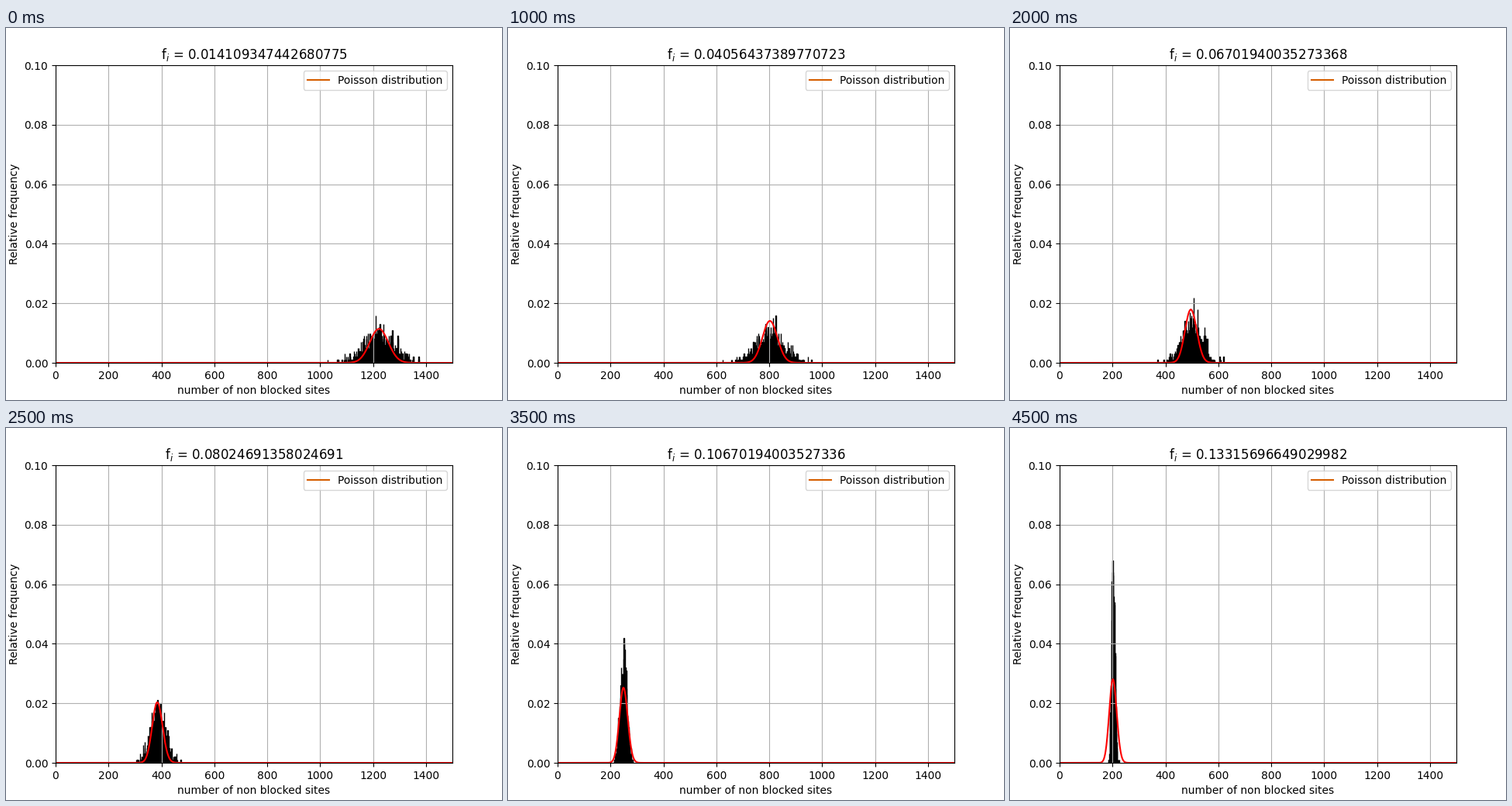
A matplotlib script that plays this animation: 640x480 px, repeating every 5000 ms.

```python
import numpy as np
import matplotlib.pyplot as plt
from matplotlib.animation import FuncAnimation

STEPS = 10
SAMPLES = 1000

sites = np.arange(1501)
log_fact = np.concatenate(([0], np.cumsum(np.log(sites[1:]))))

# smooth decay of the mean through a few key steps
mean_at = np.poly1d(np.polyfit([0, 1, 2, 5, 7, 9],
                               [1223, 997, 803, 385, 249.5, 202], 5))


def spread_at(i):
    return 51 / (1 + (i / 5.1) ** 3.5)


def poisson(mu):
    return np.exp(sites * np.log(mu) - log_fact - mu)


def histogram(i):
    rng = np.random.default_rng(40 + i)
    draws = rng.normal(mean_at(i), spread_at(i), SAMPLES)
    counts = np.bincount(np.rint(draws).astype(int), minlength=sites.size)
    x = np.flatnonzero(counts)
    return x, counts[x] / SAMPLES


fig = plt.figure(figsize=(6.4, 4.8), dpi=100)
ax = fig.add_axes([0.1, 0.1, 0.8, 0.8])
ax.set_xlim(0, 1500)
ax.set_ylim(0, 0.1)
ax.set_xlabel("number of non blocked sites")
ax.set_ylabel("Relative frequency")
ax.grid(True)
ax.plot([], [], color="#d55e00", label="Poisson distribution")
ax.legend(loc="upper right")
curve, = ax.plot([], [], color="red")
title = ax.set_title("")
bars = []


def draw(i):
    while bars:
        bars.pop().remove()
    x, heights = histogram(i)
    bars.append(ax.bar(x, heights, width=1, color="black",
                       edgecolor="black", linewidth=1))
    curve.set_data(sites, poisson(mean_at(i)))
    title.set_text(f"f$_i$ = {(16 + 15 * i) / 1134}")
    return [curve, title]


anim = FuncAnimation(fig, draw, frames=STEPS, interval=500,
                     init_func=lambda: draw(0), repeat=True, repeat_delay=0)
plt.show()
```
